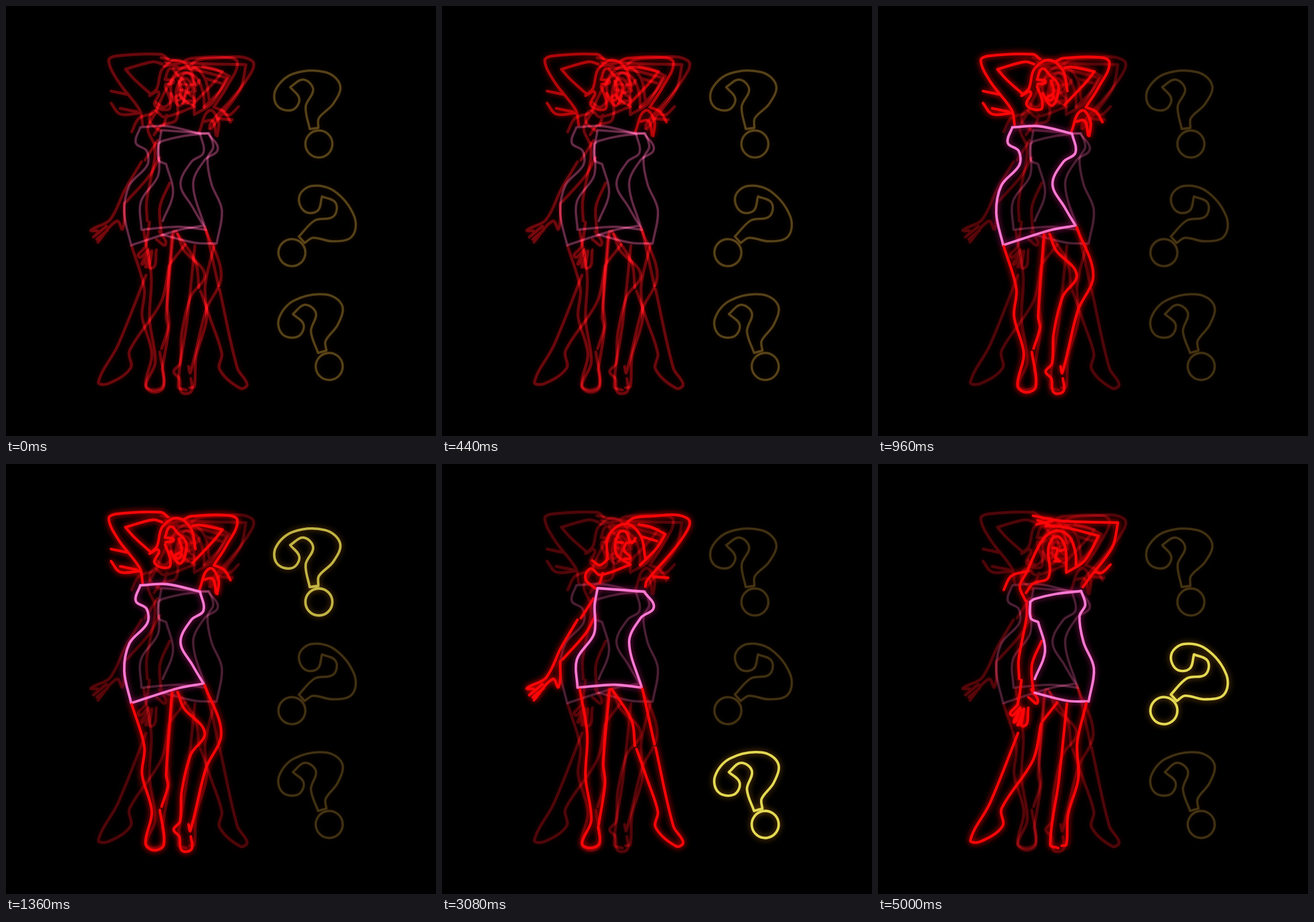
An HTML page with a canvas that plays this animation: 749 px wide and 748 px high, repeating every 5.76 s.

```html
<!DOCTYPE html>
<html lang="en">
<head>
<meta charset="utf-8">
<title>Neon sign</title>
<style>
html, body { margin: 0; width: 100%; height: 100%; overflow: hidden; background: #000; }
canvas { display: block; width: 749px; height: 748px; }
</style>
</head>
<body>
<canvas id="stage" width="749" height="748"></canvas>
<script>
const ctx = document.getElementById('stage').getContext('2d');
const LOOP = 5760, TICK = 40, HOLD = 960, FIRST_SWITCH = 2120;
const RED = { lit: '#ff0608', glow: '#ff0000', off: '#54080c', offGlow: '#300000' };
const PINK = { lit: '#fa7ad2', glow: '#b01870', off: '#58283f', offGlow: '#1c0610' };
const YELLOW = { lit: '#e4da54', glow: '#8a5c10', off: '#4c3e18', offGlow: '#1c0c00' };

// Smooth tube through key points; strokes are split by "|".
function tube(text) {
  const path = new Path2D();
  for (const stroke of text.split('|')) {
    const p = stroke.trim().split(/\s+/).map(s => s.split(',').map(Number));
    const at = i => p[Math.max(0, Math.min(p.length - 1, i))];
    const handle = (i, reach) => {
      const [a, b, c] = [at(i - 1), at(i), at(i + 1)];
      const k = reach / Math.hypot(c[0] - a[0], c[1] - a[1]);
      return [b[0] + (c[0] - a[0]) * k, b[1] + (c[1] - a[1]) * k];
    };
    path.moveTo(...p[0]);
    for (let i = 0; i < p.length - 1; i++) {
      const reach = Math.hypot(p[i + 1][0] - p[i][0], p[i + 1][1] - p[i][1]) / 3;
      path.bezierCurveTo(...handle(i, reach), ...handle(i + 1, -reach), ...p[i + 1]);
    }
  }
  return path;
}

const poses = [
  {
    head: `282,92 270,84 192,87 179,95 196,132 233,181 238,207
      | 272,101 256,97 208,110 | 208,110 224,128 253,154
      | 310,96 322,91 380,89 403,98 385,140 362,176
      | 325,108 336,106 377,114 | 377,114 362,133 325,172
      | 362,176 380,184 391,202 | 337,218 354,182 370,200 368,226
      | 345,201 360,200 366,225 | 183,148 212,154
      | 183,169 199,188 234,186 | 199,178 228,184
      | 330,148 322,112 298,94 272,110 263,143 250,156
      | 250,156 266,150 259,172 283,180 286,165 277,140
      | 277,128 286,109 299,120 314,137 310,165 301,173 287,152
      | 279,128 292,132 278,136 | 301,130 306,151 294,160 301,164 306,157`,
    dress: `234,211 280,209 338,222 | 338,222 344,255 323,271 304,310 325,350 344,382
      | 344,382 300,390 218,416
      | 218,416 206,360 215,312 246,277 245,252 226,238 234,211`,
    legs: `219,418 241,492 237,540 254,605 243,660 258,672 275,662 268,602
      | 289,398 279,540 282,560 271,596
      | 299,397 310,425 346,467 322,505 306,570 303,622 292,636 302,648 306,672 323,670 322,648
      | 346,385 375,468 348,530 321,638 318,627`
  },
  {
    head: `270,90 320,99 418,102 | 418,102 408,145 370,196 357,214
      | 276,105 304,99 | 278,98 306,109
      | 292,108 320,109 384,125 | 384,125 360,168 328,189
      | 259,238 259,265 245,340 246,374 | 285,308 268,350 271,400
      | 250,376 243,418 231,436 248,424 | 246,430 238,449 250,428 245,454 254,426
      | 254,426 254,456 262,424 | 262,406 278,415 267,392
      | 345,178 344,155 333,126 310,116 286,133 258,190 247,213 257,238
      | 258,224 270,208 297,197 297,145 311,126 326,145 328,189
      | 219,219 232,195 262,186 | 378,188 390,189 405,175
      | 304,146 312,148 309,163 314,166 | 317,151 325,149 | 308,169 317,169`,
    dress: `265,240 272,235 310,226 354,221 | 354,221 361,245 351,265 358,310 376,355 367,413
      | 367,413 330,412 273,398
      | 273,374 291,325 279,275 | 279,275 266,268 265,240`,
    legs: `244,468 195,590 161,654 178,657 217,630 215,600 270,515 284,452
      | 287,447 312,415 | 329,417 315,550 300,662 314,668
      | 363,416 347,485 349,547 331,610 328,662 320,664`
  },
  {
    head: `322,102 334,94 360,91 428,95 418,130 357,203 354,213
      | 343,105 365,110 389,122 | 389,122 375,145 345,176 | 347,126 374,134
      | 264,234 242,268 | 236,271 207,320 181,372 148,390 159,391
      | 267,264 250,295 210,340 | 206,343 203,388 193,374 160,411
      | 175,383 152,402 | 177,390 158,406
      | 288,165 290,125 320,104 346,125 354,163
      | 328,175 303,155 308,120 320,118 330,137 337,129
      | 307,136 315,137 | 323,137 336,134 | 320,138 317,150 328,163 318,165
      | 262,168 275,176 289,165
      | 326,176 275,193 259,182 250,200 268,217
      | 280,190 275,207 | 368,196 394,198`,
    dress: `271,216 352,222 | 352,222 369,249 346,268 326,310 348,389
      | 348,389 300,384 236,389
      | 236,389 235,340 265,295 266,245 271,216`,
    legs: `240,392 253,470 250,545 260,620 244,660 258,668 274,660 272,631
      | 292,392 281,520 284,555 273,627
      | 296,392 330,445 336,490
      | 339,496 358,550 376,605 372,632 408,665 420,658 403,630 372,493
      | 349,391 370,487`
  }
];

// One question mark, measured from the centre of its dot.
const hook = tube(`-16,-26 -23,-65 -10,-95 -27,-112 -50,-99 | -50,-99 -34,-78 -47,-59 -73,-67 -75,-95 -45,-122 11,-125 37,-102 25,-70 0,-45 -1,-28 | -1,-28 -16,-26`);
hook.moveTo(23.5, 0);
hook.arc(0, 0, 23.5, 0, Math.PI * 2);

function place(x, y, degrees) {
  const path = new Path2D();
  path.addPath(hook, new DOMMatrix().translate(x, y).rotate(degrees));
  return path;
}
const marks = [place(545, 240, 0), place(498, 429, 55), place(563, 627, -8)];

const tints = { head: RED, dress: PINK, legs: RED, mark: YELLOW };
const parts = poses.flatMap((pose, index) => [
  ...Object.entries(pose).map(([name, text]) => ({ index, name, path: tube(text), tint: tints[name] })),
  { index, name: 'mark', path: marks[index], tint: YELLOW }
]);

const ramp = (t, from, to) => Math.max(0, Math.min(1, (t - from) / (to - from)));
const warmUp = { head: [160, 600], legs: [440, 840], dress: [720, 960], mark: [1080, 1400] };

function level({ index, name }, t) {
  if (t >= FIRST_SWITCH) return +(index === (Math.floor((t - FIRST_SWITCH) / HOLD) + 1) % 3);
  return index === 0 ? ramp(t, ...warmUp[name]) ** 2 : 0;
}

function stroke(path, color, width, alpha, glow, blur) {
  ctx.globalAlpha = alpha;
  ctx.strokeStyle = color;
  ctx.lineWidth = width;
  ctx.shadowColor = glow;
  ctx.shadowBlur = blur;
  ctx.stroke(path);
}

function draw(now) {
  const t = Math.floor(now % LOOP / TICK) * TICK;
  const ambient = 1 - 0.25 * ramp(t, 480, 920);
  ctx.globalCompositeOperation = 'source-over';
  ctx.globalAlpha = 1;
  ctx.shadowBlur = 0;
  ctx.fillStyle = '#000';
  ctx.fillRect(0, 0, 749, 748);
  ctx.lineCap = ctx.lineJoin = 'round';

  ctx.globalCompositeOperation = 'lighter';
  for (const { path, tint } of parts)
    stroke(path, tint.off, tint === RED ? 5 : 4, ambient, tint.offGlow, 8);

  ctx.globalCompositeOperation = 'source-over';
  for (const part of parts) {
    const power = level(part, t);
    if (power) stroke(part.path, part.tint.lit, 4.3, power, part.tint.glow, 11);
  }
}

const start = performance.now();
function loop() {
  draw(performance.now() - start);
  requestAnimationFrame(loop);
}
loop();
</script>
</body>
</html>
```
